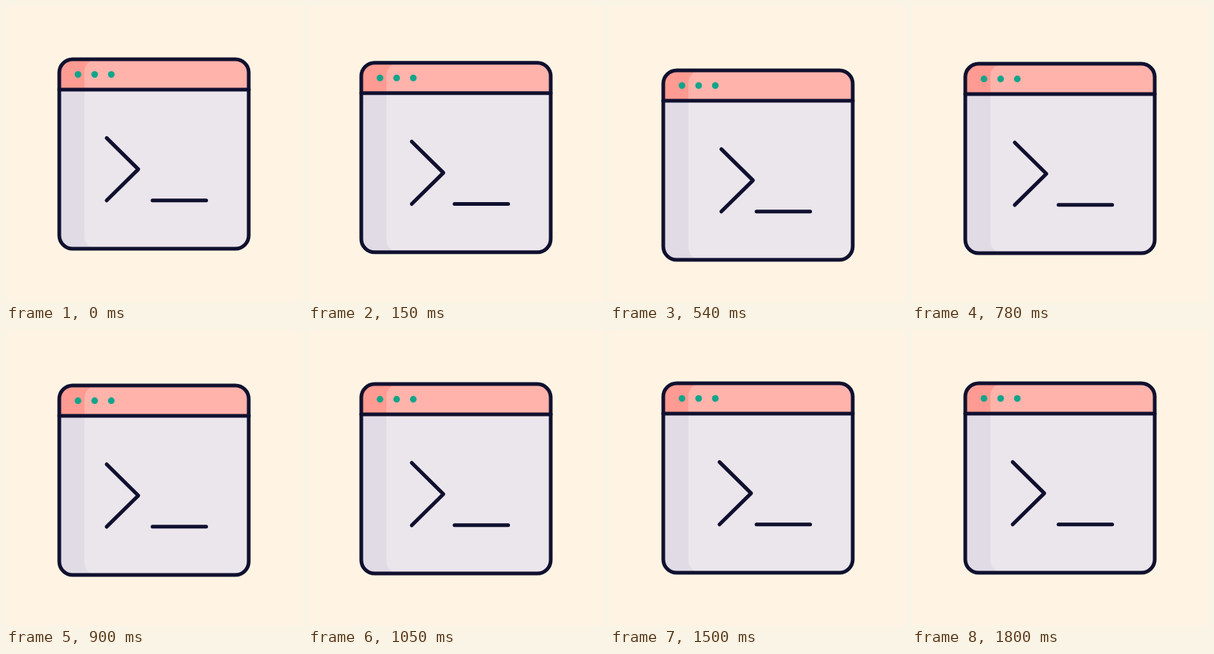
Write an HTML page that moves like this. It is 400 px wide and 400 px high and loops after 5.33 s.

```html
<!DOCTYPE html>
<html lang="en">
<head>
<meta charset="utf-8">
<title>Terminal window</title>
<style>
  html, body { margin: 0; height: 100%; overflow: hidden; background: #fff4e3; }
  svg { display: block; width: 100%; height: 100%; }
  .line { fill: none; stroke: #10102f; stroke-width: 5; stroke-linecap: round; stroke-linejoin: round; }
</style>
</head>
<body>
<svg viewBox="0 0 400 400">
  <defs>
    <clipPath id="frame"><rect x="72" y="72" width="256" height="256" rx="18"/></clipPath>
    <clipPath id="lit"><rect x="106" y="72.5" width="250" height="255" rx="16"/></clipPath>
  </defs>
  <g id="window">
    <g clip-path="url(#frame)">
      <path fill="#e1dbe6" d="M72 113H328V328H72Z"/>
      <path fill="#ff9b92" d="M72 72H328V113H72Z"/>
      <g clip-path="url(#lit)">
        <path fill="#ebe6ec" d="M72 113H328V328H72Z"/>
        <path fill="#ffb3ab" d="M72 72H328V113H72Z"/>
      </g>
    </g>
    <g fill="#12a58a">
      <circle cx="97.3" cy="92.5" r="4.5"/>
      <circle cx="119.8" cy="92.5" r="4.5"/>
      <circle cx="142.3" cy="92.5" r="4.5"/>
    </g>
    <rect class="line" x="72" y="72" width="256" height="256" rx="18"/>
    <path class="line" d="M72 113H328M198 262.7H270.5"/>
    <path class="line" id="prompt" d="M136 178.4L178.8 220.6L136 262.8"/>
  </g>
</svg>
<script>
  const LOOP = 5330, STEP = 30, LAST_STEP = 60;
  const DROP = 15.6, NUDGE = 16.1;
  const windowGroup = document.getElementById('window');
  const promptMark = document.getElementById('prompt');

  const smooth = u => u * u * (3 - 2 * u);

  // Cubic Bezier easing with control points (x1, 0) and (x2, 1).
  function ease(x1, x2, u) {
    let low = 0, high = 1;
    for (let i = 0; i < 24; i++) {
      const s = (low + high) / 2, r = 1 - s;
      if (3 * x1 * s * r * r + 3 * x2 * s * s * r + s ** 3 < u) low = s;
      else high = s;
    }
    return smooth(low);
  }

  function dropAt(step) {
    if (step < 15) return DROP * ease(1 / 3, 0.53, step / 15);
    if (step < 45) return DROP * (1 - ease(1 / 3, 0.175, (step - 15) / 30));
    return 0;
  }

  // Two identical back-and-forth nudges, 15 steps each way.
  const nudgeAt = step => NUDGE * smooth(1 - Math.abs(step % 30 - 15) / 15);

  function render(now) {
    const step = Math.min(LAST_STEP, Math.floor((now % LOOP) / STEP));
    windowGroup.setAttribute('transform', `translate(0 ${dropAt(step).toFixed(3)})`);
    promptMark.setAttribute('transform', `translate(${nudgeAt(step).toFixed(3)} 0)`);
  }

  const start = performance.now();
  function tick() {
    render(performance.now() - start);
    requestAnimationFrame(tick);
  }
  tick();
</script>
</body>
</html>
```
